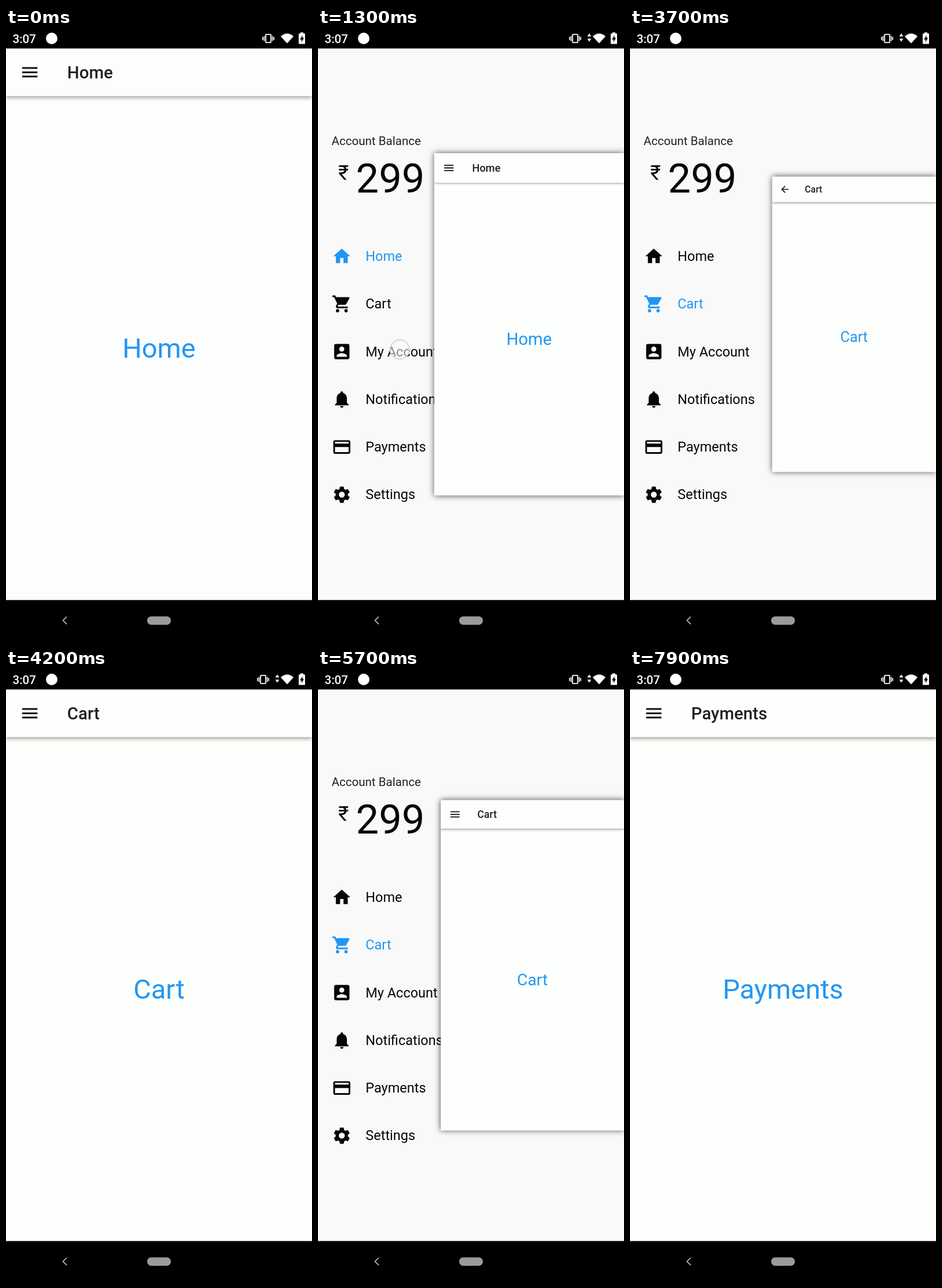
An HTML page with a canvas for the animation above (8 s loop, 529 by 1058 pixels).

```html
<!DOCTYPE html>
<html lang="en">
<head>
<meta charset="utf-8">
<title>Scaling drawer</title>
<style>
html, body { margin: 0; width: 100%; height: 100%; overflow: hidden; background: #000; }
canvas { display: block; width: 529px; height: 1058px; }
</style>
</head>
<body>
<canvas id="stage" width="529" height="1058"></canvas>
<script>
const ctx = document.getElementById('stage').getContext('2d');
const W = 529, H = 1058, LOOP = 8000;
const DP = W / 360;
const TOP = 24 * DP, BOTTOM = H - 48 * DP, BODY = BOTTOM - TOP, BAR = 56 * DP;
const BLUE = '#2196f3', INK = '#060606';
const SLIDE = 450;

const icons = {
  menu: 'M3 18h18v-2H3v2zm0-5h18v-2H3v2zm0-7v2h18V6H3z',
  back: 'M20 11H7.83l5.59-5.59L12 4l-8 8 8 8 1.41-1.41L7.83 13H20v-2z',
  home: 'M10 20v-6h4v6h5v-8h3L12 3 2 12h3v8z',
  cart: 'M7 18c-1.1 0-1.99.9-1.99 2S5.9 22 7 22s2-.9 2-2-.9-2-2-2zM1 2v2h2l3.6 7.59-1.35 2.45c-.16.28-.25.61-.25.96 0 1.1.9 2 2 2h12v-2H7.42c-.14 0-.25-.11-.25-.25l.03-.12.9-1.63h7.45c.75 0 1.41-.41 1.75-1.03l3.58-6.49c.08-.14.12-.31.12-.48 0-.55-.45-1-1-1H5.21l-.94-2H1zm16 16c-1.1 0-1.99.9-1.99 2s.89 2 1.99 2 2-.9 2-2-.9-2-2-2z',
  account: 'M3 5v14c0 1.1.89 2 2 2h14c1.1 0 2-.9 2-2V5c0-1.1-.9-2-2-2H5c-1.11 0-2 .9-2 2zm12 4c0 1.66-1.34 3-3 3s-3-1.34-3-3 1.34-3 3-3 3 1.34 3 3zm-9 8c0-2 4-3.1 6-3.1s6 1.1 6 3.1v1H6v-1z',
  bell: 'M12 22c1.1 0 2-.9 2-2h-4c0 1.1.89 2 2 2zm6-6v-5c0-3.07-1.64-5.64-4.5-6.32V4c0-.83-.67-1.5-1.5-1.5s-1.5.67-1.5 1.5v.68C7.63 5.36 6 7.92 6 11v5l-2 2v1h16v-1l-2-2z',
  card: 'M20 4H4c-1.11 0-1.99.89-1.99 2L2 18c0 1.11.89 2 2 2h16c1.11 0 2-.89 2-2V6c0-1.11-.89-2-2-2zm0 14H4v-6h16v6zm0-10H4V6h16v2z',
  vibrate: 'M0 15h2V9H0v6zm3 2h2V7H3v10zm19-8v6h2V9h-2zm-3 8h2V7h-2v10zM16.5 3h-9C6.67 3 6 3.67 6 4.5v15c0 .83.67 1.5 1.5 1.5h9c.83 0 1.5-.67 1.5-1.5v-15c0-.83-.67-1.5-1.5-1.5zM16 19H8V5h8v14z',
  wifi: 'M0 5Q11-5 22 5L11 17z',
  updown: 'M0 5L3.5 0 7 5zM0 9L3.5 14 7 9z',
  battery: 'M3 0h5v2h2.2q.8 0 .8.8v16.4q0 .8-.8.8H.8q-.8 0-.8-.8V2.8Q0 2 .8 2H3zM6.6 5L2.2 12.3h2.6V17L9 9.7H6.6z'
};
for (const name in icons) icons[name] = new Path2D(icons[name]);
icons.gear = gearPath();

const items = [
  ['Home', 'home'], ['Cart', 'cart'], ['My Account', 'account'],
  ['Notifications', 'bell'], ['Payments', 'card'], ['Settings', 'gear']
];

function gearPath() {
  const path = new Path2D();
  const corners = [[7.2, -22.5], [9.75, -13], [9.75, 13], [7.2, 22.5]];
  for (let tooth = 0; tooth < 6; tooth++) {
    for (const [r, deg] of corners) {
      const a = (tooth * 60 + deg - 90) * Math.PI / 180;
      path.lineTo(12 + r * Math.cos(a), 12 + r * Math.sin(a));
    }
  }
  path.closePath();
  path.moveTo(15.5, 12);
  path.arc(12, 12, 3.5, 0, 2 * Math.PI);
  return path;
}

const clamp = v => Math.min(1, Math.max(0, v));

function icon(name, x, y, scale, color) {
  ctx.save();
  ctx.translate(x, y);
  ctx.scale(scale, scale);
  ctx.fillStyle = color;
  ctx.fill(icons[name], 'evenodd');
  ctx.restore();
}

// y is the middle of the line box
function text(str, x, y, size, color, weight = 400, align = 'left') {
  ctx.font = `${weight} ${size}px Roboto, sans-serif`;
  ctx.textAlign = align;
  ctx.fillStyle = color;
  ctx.fillText(str, x, y + size * 0.3415);
}

function dragX(t) {
  return 15 + 192 * (1 - Math.pow(1 - clamp((t - 1000) / 800), 2.27));
}

function openness(t) {
  if (t < 3400) return clamp((dragX(t) - 15) / 166.3);
  if (t < 5000) return 1 - clamp((t - 3669) / SLIDE);
  if (t < 7000) return clamp((t - 5340) / SLIDE);
  return 1 - clamp((t - 7369) / SLIDE);
}

function touchAt(t) {
  if (t >= 1000 && t < 1900) return [dragX(t), 555];
  if (t >= 3400 && t < 3600) return [130, 484];
  if (t >= 7100 && t < 7300) return [138, 734.5];
  return null;
}

function drawMenu(page) {
  ctx.fillStyle = '#f8f9f8';
  ctx.fillRect(0, TOP, W, BODY);
  text('Account Balance', 16 * DP, 194.5, 14 * DP, '#222');
  text('₹', 35, 250, 24 * DP, INK);
  text('299', 65.5, 260, 48 * DP, INK);
  items.forEach(([label, glyph], i) => {
    const y = 394 + i * 56 * DP;
    const color = label === page ? BLUE : INK;
    icon(glyph, 16 * DP, y - 12 * DP, DP, color);
    text(label, 56 * DP, y, 16 * DP, color);
  });
}

function drawPanel(page, open, arrow, paper) {
  const s = 1 - open / 2;
  ctx.save();
  ctx.translate(W * (1 - s), TOP + BODY * (1 - s) / 2);
  ctx.scale(s, s);

  ctx.fillStyle = paper;
  ctx.shadowColor = 'rgba(0,0,0,.7)';
  ctx.shadowBlur = 10;
  ctx.fillRect(0, 0, W, BODY);

  ctx.beginPath();
  ctx.rect(0, 0, W, BODY);
  ctx.clip();
  ctx.shadowColor = 'rgba(0,0,0,.4)';
  ctx.shadowBlur = 7 * s;
  ctx.shadowOffsetY = 2 * s;
  ctx.fillRect(0, 0, W, BAR);
  ctx.shadowColor = 'transparent';

  icon(arrow ? 'back' : 'menu', 16 * DP, BAR / 2 - 12 * DP, DP, '#111');
  text(page, 72 * DP, BAR / 2 + 0.5, 20 * DP, '#212121', 500);
  text(page, W / 2, (BAR + BODY) / 2, 32 * DP, BLUE, 400, 'center');
  ctx.restore();
}

function drawSystemBars(data) {
  ctx.fillStyle = '#000';
  ctx.fillRect(0, 0, W, TOP);
  ctx.fillRect(0, BOTTOM, W, H - BOTTOM);

  text('3:07', 11.5, 18.5, 20.5, '#fff', 500);
  ctx.beginPath();
  ctx.arc(79, 18, 10, 0, 2 * Math.PI);
  ctx.fill();
  icon('vibrate', data ? 434 : 443, 7.5, 0.875, '#fff');
  if (data) icon('updown', 465.5, 9.5, 1, '#fff');
  icon('wifi', 475, 9.5, 1, '#fff');
  icon('battery', 506, 7.5, 1, '#fff');

  ctx.strokeStyle = '#a8a8a8';
  ctx.lineWidth = 1.8;
  ctx.beginPath();
  ctx.moveTo(105, 1016);
  ctx.lineTo(98.5, 1022.5);
  ctx.lineTo(105, 1029);
  ctx.stroke();
  ctx.fillStyle = '#9b9b9b';
  ctx.beginPath();
  ctx.roundRect(244, 1015.5, 41, 14.5, 7.2);
  ctx.fill();
}

function drawTouch([x, y]) {
  ctx.beginPath();
  ctx.arc(x, y, 16.5, 0, 2 * Math.PI);
  ctx.fillStyle = 'rgba(250,250,252,.55)';
  ctx.fill();
  ctx.strokeStyle = '#d2d3e8';
  ctx.lineWidth = 2;
  ctx.stroke();
}

function draw(t) {
  const page = t < 3550 ? 'Home' : t < 7250 ? 'Cart' : 'Payments';
  const arrow = t >= 1900 && t < 4119 || t >= 6100 && t < 7819;
  const open = openness(t);
  const touch = touchAt(t);
  drawMenu(page);
  drawPanel(page, open, arrow, t < 500 ? '#fefdfe' : '#fdfffc');
  drawSystemBars(t >= 500);
  if (touch) drawTouch(touch);
}

const start = performance.now();
function tick() {
  draw((performance.now() - start) % LOOP);
  requestAnimationFrame(tick);
}
tick();
</script>
</body>
</html>
```
